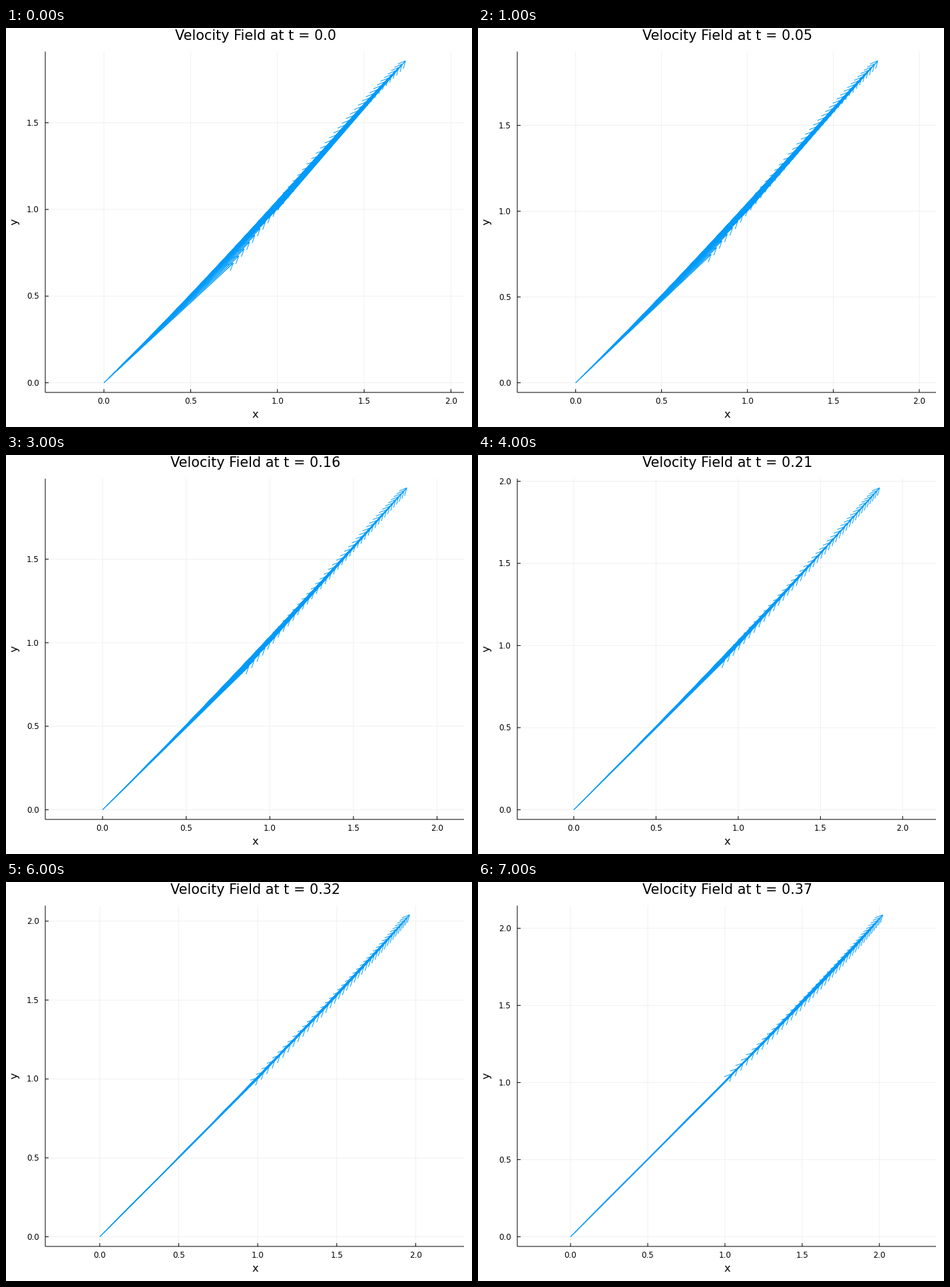
These frames come from a looping animation (700 px wide and 600 px high, 8 s). A matplotlib script:

```python
import numpy as np
import matplotlib.pyplot as plt
from matplotlib.animation import FuncAnimation
from matplotlib.collections import LineCollection

W, H, DPI = 700, 600, 100
PT = 72 / DPI                      # points per pixel
LEFT, RIGHT, TOP, BOTTOM = 59, 688, 35.5, 548
ZERO_Y = 533.5                     # pixel row of y = 0
REACH = 484                        # pixel height of the tallest arrow tip
MID_X = 373.5
FRAMES, STEPS = 8, 19
BLUE, GRID = "#009afa", "#f0f0f0"

plt.rcParams["font.family"] = "DejaVu Sans"
fig = plt.figure(figsize=(W / DPI, H / DPI), dpi=DPI, facecolor="white")
ax = fig.add_axes([0, 0, 1, 1])
s = np.linspace(0, 1, 40)


def velocity(k):
    """Velocity along the diagonal at step k, quadratic in position."""
    u0 = 0.745 + 0.043 * k
    u1 = 0.7375 + 0.0168 * k + 0.0034 * k**2
    v1 = 0.857 + 0.016 * k + 0.0024 * k**2
    bulge = 0.25 + 0.03 * k
    u = u0 + (u1 - u0) * s + bulge * s * (1 - s)
    # difference between the two components
    d0 = -0.055 + 0.0155 * k - 0.0009 * k**2
    d1 = v1 - u1
    skew = 0.2 - 0.04 * k
    v = u + d0 + (d1 - d0) * s + skew * s * (1 - s)
    return u, v


def line(x, y, color):
    ax.plot(x, y, color=color, lw=PT, solid_capstyle="butt", snap=False)


def text(x, y, label, size, **kw):
    kw = {"ha": "center", "va": "baseline", **kw}
    ax.text(x, y, label, fontsize=size * PT, color="black", **kw)


def arrows(px, py, qx, qy):
    """Shafts and open heads, in pixels."""
    length = np.hypot(qx - px, qy - py)
    dx, dy = (qx - px) / length, (qy - py) / length
    back, side = 11, 5.5
    bx, by = qx - back * dx, qy - back * dy
    shafts = np.stack([np.c_[px, py], np.c_[qx, qy]], axis=1)
    heads = np.stack([np.c_[bx - side * dy, by + side * dx],
                      np.c_[qx, qy],
                      np.c_[bx + side * dy, by - side * dx]], axis=1)
    # shafts are laid down twice, which makes them denser than the heads
    for parts in (shafts, shafts, heads):
        ax.add_collection(LineCollection(parts, colors=BLUE, linewidths=PT,
                                         zorder=3))


def draw(k):
    ax.clear()
    ax.set_xlim(0, W)
    ax.set_ylim(H, 0)
    ax.axis("off")

    u, v = velocity(k)
    scale = REACH / (s + v).max()
    zero_x = MID_X - scale * (s + u).max() / 2

    def to_x(x):
        return zero_x + scale * x

    def to_y(y):
        return ZERO_Y - scale * y

    ticks = np.arange(0, 3, 0.5)
    xs = [(t, to_x(t)) for t in ticks if to_x(t) <= RIGHT]
    ys = [(t, to_y(t)) for t in ticks if to_y(t) >= TOP]
    for _, x in xs:
        line([x, x], [TOP, BOTTOM], GRID)
    for _, y in ys:
        line([LEFT, RIGHT], [y, y], GRID)

    line([LEFT, RIGHT], [BOTTOM, BOTTOM], "black")
    line([LEFT, LEFT], [TOP, BOTTOM], "black")
    for t, x in xs:
        line([x, x], [BOTTOM, BOTTOM - 5], "black")
        text(x, 565, f"{t:.1f}", 11.9)
    for t, y in ys:
        line([LEFT, LEFT + 5], [y, y], "black")
        text(50, y + 4.3, f"{t:.1f}", 11.9, ha="right")

    arrows(to_x(s), to_y(s), to_x(s + u), to_y(s + v))

    text(374.5, 18, f"Velocity Field at t = {round(k / STEPS, 2)}", 20.8)
    text(374, 586, "x", 16.3)
    text(13.5, 291.5, "y", 16.3, rotation=90, va="center")
    return ax.get_children()


anim = FuncAnimation(fig, draw, frames=FRAMES, interval=1000,
                     repeat=True, repeat_delay=0, blit=False)
plt.show()
```
